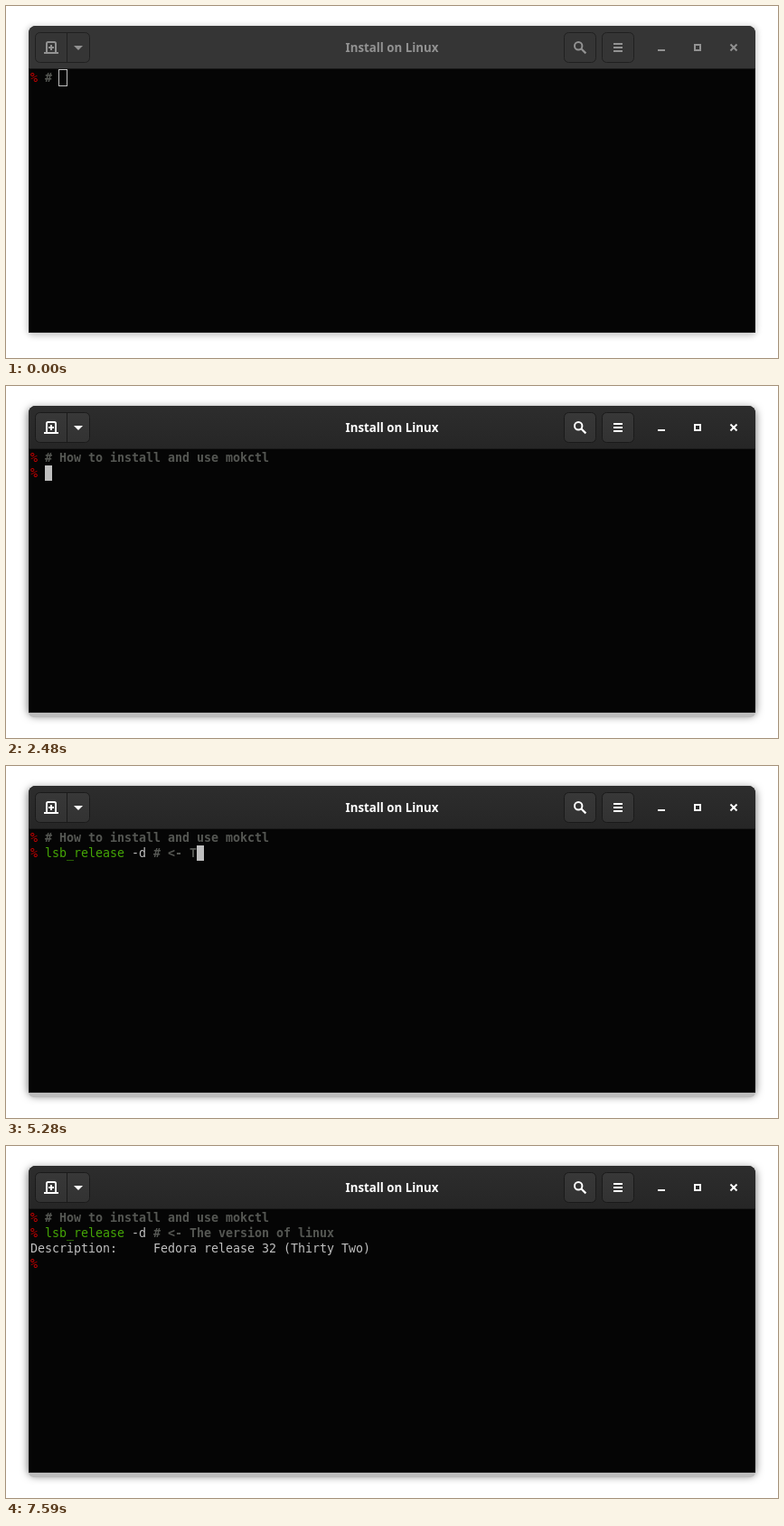
These frames come from a looping animation (854x390 px, 8 s). An HTML page with a canvas:

```html
<!DOCTYPE html>
<html lang="en">
<head>
<meta charset="utf-8">
<title>Install on Linux</title>
<style>
html, body { margin: 0; width: 100%; height: 100%; overflow: hidden; background: #fff; }
canvas { display: block; width: 854px; height: 390px; }
</style>
</head>
<body>
<canvas id="stage" width="854" height="390"></canvas>
<script>
const ctx = document.getElementById('stage').getContext('2d');
const LOOP = 8000, CELL = 8, ROW = 17, LEFT = 27, TOP = 71;
const RED = '#cc0000', GREEN = '#45a606', GREY = '#bfbfbf', DIM = '#555753';
const MONO = '13.333px "DejaVu Sans Mono", monospace';
const ENTER1 = 2480, OUTPUT = 6870, PROMPT = 7000;

// Typed runs: text, time of first key, time of last key
const line1 = [
  ['How t', 190, 380], ['o insta', 520, 800], ['ll', 940, 1030], [' ', 1100, 1100],
  ['and ', 1180, 1390], ['use mokc', 1430, 1970], ['tl', 2030, 2070]
];
const line2 = [
  ['lsb_relea', 3780, 4400], ['se', 4470, 4510], [' ', 4580, 4580], ['-d', 4660, 4730],
  [' # <- T', 4920, 5280], ['h', 5360, 5360], ['e version of li', 5500, 6290], ['nux', 6370, 6500]
];
// The cursor goes off, on, off, ...
const blinks = [580, 1180, 1810, 2420, 2990, 3620, 4190, 4770, 5320, 5930, 6430, 7000, 7590];

function typed(runs, t) {
  let out = '';
  for (const [text, from, to] of runs) {
    if (t < from) break;
    const step = (to - from) / (text.length - 1) || 1;
    out += text.slice(0, Math.floor((t - from) / step + 1e-6) + 1);
  }
  return out;
}

function put(text, col, row, color, bold) {
  ctx.font = (bold ? 'bold ' : '') + MONO;
  ctx.fillStyle = color;
  ctx.textAlign = 'left';
  [...text].forEach((ch, i) => {
    if (ch !== ' ') ctx.fillText(ch, LEFT + (col + i) * CELL, TOP + row * ROW + 13);
  });
}

function box(x, y, w, h, r) {
  ctx.beginPath();
  ctx.roundRect(x, y, w, h, r);
}

function line(width, ...points) {
  ctx.lineWidth = width;
  ctx.beginPath();
  points.forEach(([x, y], i) => i ? ctx.lineTo(x, y) : ctx.moveTo(x, y));
  ctx.stroke();
}

function shadow(alpha, dy, blur, spread, color) {
  ctx.save();
  ctx.globalAlpha = alpha;
  ctx.shadowColor = color;
  ctx.shadowBlur = blur;
  ctx.shadowOffsetY = dy;
  ctx.fillStyle = '#000';
  box(25 - spread, 22 - spread, 804 + 2 * spread, 340 + 2 * spread, [8, 8, 4, 4]);
  ctx.clip(outside(), 'evenodd');
  box(25 - spread, 22 - spread, 804 + 2 * spread, 340 + 2 * spread, [8, 8, 4, 4]);
  // Cast from off stage so that only the shadow shows
  ctx.translate(-2000, 0);
  ctx.shadowOffsetX = 2000;
  box(25 - spread, 22 - spread, 804 + 2 * spread, 340 + 2 * spread, 8);
  ctx.fill();
  ctx.restore();
}

function outside() {
  const p = new Path2D();
  p.rect(0, 0, 854, 390);
  p.roundRect(25, 22, 804, 340, [8, 8, 0, 0]);
  return p;
}

function button(x, w, top, bottom, edge) {
  const g = ctx.createLinearGradient(0, 29, 0, 63);
  g.addColorStop(0, top);
  g.addColorStop(1, bottom);
  box(x + 0.5, 29.5, w - 1, 33, 5);
  ctx.fillStyle = g;
  ctx.fill();
  ctx.lineWidth = 1;
  ctx.strokeStyle = edge;
  ctx.stroke();
}

function icons(ink) {
  ctx.fillStyle = ctx.strokeStyle = ink;
  // New tab
  line(2, [42, 52], [58, 52]);
  box(45, 40, 10, 12, [1.5, 1.5, 0, 0]);
  ctx.stroke();
  line(2, [47, 46], [53, 46]);
  line(2, [50, 43], [50, 49]);
  // Drop-down
  ctx.beginPath();
  ctx.moveTo(75, 44);
  ctx.lineTo(85, 44);
  ctx.lineTo(80, 49);
  ctx.fill();
  // Search
  ctx.beginPath();
  ctx.arc(633.2, 44.2, 4.2, 0, Math.PI * 2);
  ctx.stroke();
  line(2.2, [636.2, 47.2], [641.4, 52.4]);
  // Menu
  for (const y of [41, 45, 49]) ctx.fillRect(672, y, 10, 2);
  // Minimise, maximise, close
  ctx.fillRect(721, 48, 8, 2);
  ctx.lineWidth = 2;
  ctx.strokeRect(762, 43, 6, 6);
  line(2, [801.5, 42.5], [808.5, 49.5]);
  line(2, [808.5, 42.5], [801.5, 49.5]);
}

function header(alpha, s) {
  ctx.save();
  ctx.globalAlpha = alpha;
  const g = ctx.createLinearGradient(0, 22, 0, 69);
  g.addColorStop(0, s.top);
  g.addColorStop(1, s.bottom);
  ctx.fillStyle = g;
  box(25, 22, 804, 47, [8, 8, 0, 0]);
  ctx.fill();
  button(32, 61, s.btnTop, s.btnBottom, s.edge);
  line(1, [67.5, 30], [67.5, 62]);
  button(617, 36, s.btnTop, s.btnBottom, s.edge);
  button(659, 36, s.btnTop, s.btnBottom, s.edge);
  icons(s.ink);
  ctx.font = 'bold 13.3px "Noto Sans", "Open Sans", sans-serif';
  ctx.textAlign = 'center';
  ctx.fillText('Install on Linux', 427, 51);
  ctx.restore();
}

const idle = { top: '#353535', bottom: '#353535', btnTop: '#353535', btnBottom: '#353535',
  edge: '#202020', ink: '#929292' };
const active = { top: '#2d2d2d', bottom: '#262626', btnTop: '#383838', btnBottom: '#323232',
  edge: '#1a1a1a', ink: '#ffffff' };

function frame(focus) {
  ctx.fillStyle = '#fff';
  ctx.fillRect(0, 0, 854, 390);
  shadow(1 - focus, 2, 6, 2, 'rgba(0,0,0,.2)');
  shadow(focus, 3, 9, 1, 'rgba(0,0,0,.5)');
  ctx.globalAlpha = focus;
  ctx.fillStyle = '#bcbcbc';
  box(25, 361, 804, 6, [0, 0, 6, 6]);
  ctx.fill();
  ctx.globalAlpha = 1;
  ctx.fillStyle = '#1b1b1b';
  box(25, 22, 804, 340, [8, 8, 0, 0]);
  ctx.fill();
  header(1, idle);
  if (focus > 0) header(focus, active);
  ctx.fillStyle = '#050505';
  ctx.fillRect(26, 70, 802, 291);
}

function terminal(t) {
  const first = '# ' + typed(line1, t);
  let row = 0, col = 2 + first.length;
  put('%', 0, 0, RED);
  put(first, 2, 0, DIM, true);

  if (t >= ENTER1) {
    const text = typed(line2, t);
    const word = text.split(' ')[0];
    const known = word === 'ls' || word === 'lsb_release';
    put('%', 0, 1, RED);
    put(word, 2, 1, known ? GREEN : RED, !known);
    put(text.slice(12, 14), 14, 1, GREY);
    put(text.slice(15), 17, 1, DIM, true);
    row = 1;
    col = 2 + text.length;
  }
  if (t >= OUTPUT) {
    put('Description:     Fedora release 32 (Thirty Two)', 0, 2, GREY);
    row = 3;
    col = 0;
  }
  if (t >= PROMPT) {
    put('%', 0, 3, RED);
    col = 2;
  }

  const x = LEFT + col * CELL, y = TOP + row * ROW;
  if (t < 150) {
    ctx.strokeStyle = GREY;
    ctx.lineWidth = 1;
    ctx.strokeRect(x - 0.5, y - 0.5, CELL + 1, ROW + 1);
  } else if (blinks.filter(b => b <= t).length % 2 === 0) {
    ctx.fillStyle = GREY;
    ctx.fillRect(x, y, CELL, ROW);
  }
}

const start = performance.now();
function draw() {
  const t = (performance.now() - start) % LOOP;
  const p = Math.min(1, Math.max(0, (t - 140) / 210));
  frame(1 - (1 - p) * (1 - p) * (t >= 150 ? 1 : 0) - (t < 150 ? 1 : 0));
  terminal(t);
  requestAnimationFrame(draw);
}
draw();
</script>
</body>
</html>
```
